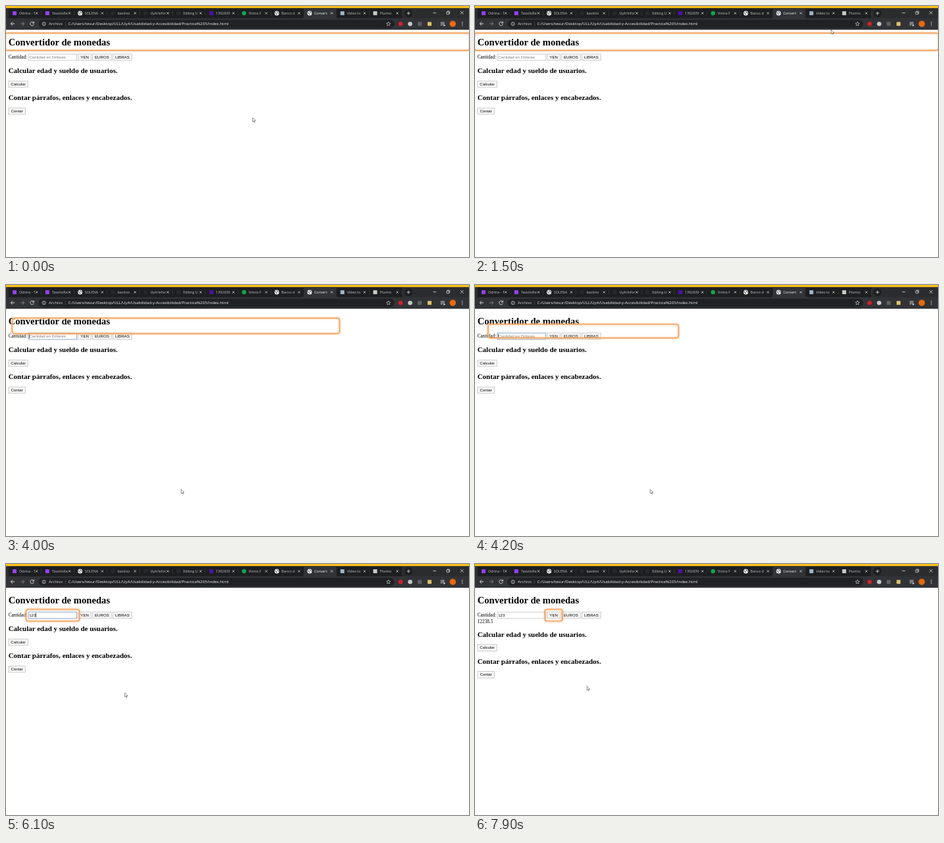
Write an HTML page that moves like this. It is 704x382 px and loops after 8 s.

```html
<!DOCTYPE html>
<html lang="es">
<head>
<meta charset="utf-8">
<title>Convertidor de monedas</title>
<style>
html, body { margin: 0; width: 100%; height: 100%; overflow: hidden; background: #fff; }
svg { display: block; width: 100vw; height: 100vh; }
svg svg { width: 24px; height: 16px; }
text { white-space: pre; }
.ui { font-family: "Open Sans", "Noto Sans", sans-serif; }
.serif { font-family: "Liberation Serif", "Times New Roman", serif; }
.form { font-family: "Liberation Sans", Arial, sans-serif; font-size: 6.11px; }
</style>
</head>
<body>
<svg id="stage" viewBox="0 0 704 382">
  <defs>
    <filter id="glow" filterUnits="userSpaceOnUse" x="-10" y="30" width="724" height="80">
      <feGaussianBlur stdDeviation="0.9"/>
    </filter>
  </defs>
</svg>
<script>
const NS = 'http://www.w3.org/2000/svg';
const stage = document.getElementById('stage');

function add(parent, tag, attrs, content) {
  const node = document.createElementNS(NS, tag);
  set(node, attrs);
  if (content !== undefined) node.textContent = content;
  return parent.appendChild(node);
}
function set(node, attrs) {
  for (const key in attrs) node.setAttribute(key, attrs[key]);
}
const rect = (p, x, y, width, height, fill, more) =>
  add(p, 'rect', { x, y, width, height, fill, ...more });
const disc = (p, cx, cy, r, fill, more) => add(p, 'circle', { cx, cy, r, fill, ...more });
const line = (p, d, stroke, width = 0.8) =>
  add(p, 'path', { d, stroke, 'stroke-width': width, fill: 'none' });
const label = (p, x, y, str, cls, size, fill = '#000', more) =>
  add(p, 'text', { x, y, class: cls, fill, ...(size && { 'font-size': size }), ...more }, str);
const show = (node, on) => set(node, { visibility: on ? 'visible' : 'hidden' });

// Browser frame
const STRIP = '#2b2c2e', TAB_BACK = '#1d1e20', BAR = '#323337', PALE = '#e8eaed';
const TAB = 49.85, ACTIVE = 9;
const frame = add(stage, 'g', {});
rect(frame, 0, 0, 704, 20, STRIP);
rect(frame, 4, 3.2, TAB * 12, 16, TAB_BACK);
rect(frame, 0, 0, 704, 3.2, '#fcc21b');
rect(frame, 0, 18.6, 704, 17.6, BAR);

function globe(x, y) {
  disc(frame, x, y, 3.5, '#f1f3f4');
  line(frame, `M${x - 2.6} ${y - 0.8}l2 1.2 0.4 1.8M${x + 0.2} ${y - 2.6}l0.6 1.6 2 0.6`, '#3c4043', 1);
}
const square = color => (x, y) => rect(frame, x - 3, y - 3, 6, 6, color, { rx: 0.6 });
const round = color => (x, y) => disc(frame, x, y, 3.3, color);

const tabs = [
  ['Odrina - T', square('#8f43f0')], ['TavolioRe', square('#8f43f0')],
  ['SOLENA', globe], ['bastino', round('#24292e')], ['UyA/infor', round('#24292e')],
  ['Editing U', round('#24292e')], ['1392639', square('#4a12a8')],
  ['Vintra F', round('#12a150')], ['Banco d', globe], ['Convert', globe],
  ['Video to', square('#9fb4c4')], ['Plumio', square('#c9c9c6')]
];
tabs.forEach(([name, icon], i) => {
  const x = 4 + TAB * i, active = i === ACTIVE;
  if (active) {
    add(frame, 'path', {
      d: `M${x - 3} 19q3 0 3-3V6.5q0-3 3-3h${TAB - 6}q3 0 3 3V16q0 3 3 3z`, fill: BAR
    });
  } else if (i !== ACTIVE - 1) {
    line(frame, `M${x + TAB} 7.5v7`, '#4a4c50', 0.5);
  }
  icon(x + 9, 11);
  const box = add(frame, 'svg', { x: x + 16, y: 3, width: 24, height: 16 });
  label(box, 0, 10, name, 'ui', 5.4, active ? '#f1f3f4' : '#c3c6ca');
  const cx = x + 42.7;
  line(frame, `M${cx - 1.6} 9.4l3.2 3.2m0-3.2l-3.2 3.2`, PALE, 0.75);
});
disc(frame, 612, 11, 6, TAB_BACK);
line(frame, 'M609.4 11h5.2M612 8.4v5.2', PALE);
line(frame, 'M649.5 10.5h4.6M691 8l4.6 4.6m0-4.6l-4.6 4.6', '#fff', 0.7);
line(frame, 'M670 9h3.6v3.6H670zM671 9V8h3.6v3.6h-1', '#fff', 0.6);

// Toolbar
line(frame, 'M13 27H7.4m2.6-2.7L7.3 27l2.7 2.7', PALE, 0.9);
line(frame, 'M22.2 27h5.6m-2.6-2.7l2.7 2.7-2.7 2.7', '#85888c', 0.9);
line(frame, 'M41.8 25.2a2.8 2.8 0 1 0 0.5 2.6M42.4 23.8v2.3h-2.3', PALE, 0.9);
rect(frame, 49.5, 21, 541, 12.4, '#202124', { rx: 6.2 });
disc(frame, 57.7, 27.2, 2.6, 'none', { stroke: PALE, 'stroke-width': 0.7 });
line(frame, 'M57.7 26.8v1.8M57.7 25.4v0.8', PALE, 0.7);
label(frame, 65, 29.4, 'Archivo', 'ui', 6.12, '#d4d7da');
line(frame, 'M90.6 23.6v7', '#5f6368', 0.5);
label(frame, 94.4, 29.4,
  'C:/Users/tevur/Desktop/ULL/UyA/Usabilidad-y-Accesibilidad/Practica%205/index.html',
  'ui', 6.16, '#f1f3f4');
line(frame, 'M581.5 24l0.9 2.1 2.2 0.2-1.7 1.5 0.5 2.2-1.9-1.2-1.9 1.2 0.5-2.2-1.7-1.5 2.2-0.2z', PALE, 0.6);
round('#d3202c')(600, 27.2);
round('#c6c8ca')(614.5, 27.2);
square('#5d6064')(629, 27.2);
square('#dcc06c')(644, 27.2);
line(frame, 'M660.8 25h6M660.8 27h6M660.8 29h3', PALE);
add(frame, 'path', { d: 'M665.4 27.8l2.8 1.6-2.8 1.6z', fill: PALE });
disc(frame, 679.3, 27.2, 4.8, '#e56a0c');
[24.8, 27.2, 29.6].forEach(y => disc(frame, 693.8, y, 0.7, PALE));

// Page
const page = add(stage, 'g', {});
function button(parent, x, y, width, name) {
  rect(parent, x, y, width, 9.8, '#f7f7f7', { stroke: '#adadad', 'stroke-width': 0.6 });
  label(parent, x + width / 2, y + 7, name, 'form', 0, '#000', { 'text-anchor': 'middle' });
}
const bold = { 'font-weight': 700 };
label(page, 3.67, 59.8, 'Convertidor de monedas', 'serif', 14.67, '#000', bold);
label(page, 3.67, 80.2, 'Cantidad:', 'serif', 7.33);
const field = rect(page, 34, 73.1, 73.7, 9.8, '#fff');
const hint = label(page, 35.2, 80, 'Cantidad en Dólares', 'form', 0, '#7d7d7d');
const typed = label(page, 35.2, 80, '', 'form');
const caret = rect(page, 35, 74.6, 0.6, 6.8, '#000');
button(page, 109.8, 73, 19.6, 'YEN');
button(page, 131.6, 73, 28.6, 'EUROS');
button(page, 162.5, 73, 28.7, 'LIBRAS');
const result = label(page, 3.67, 89.8, '12238.5', 'serif', 7.33);

const lower = add(page, 'g', {});
label(lower, 3.67, 102.3, 'Calcular edad y sueldo de usuarios.', 'serif', 11, '#000', bold);
button(lower, 3.9, 114.1, 29.3, 'Calcular');
label(lower, 3.67, 143.2, 'Contar párrafos, enlaces y encabezados.', 'serif', 11, '#000', bold);
button(lower, 3.9, 155.1, 25.4, 'Contar');

// Focus ring and pointer
const ring = add(stage, 'g', { fill: 'none' });
const ringRects = [
  add(ring, 'rect', { rx: 3.5, stroke: '#f8b87c', 'stroke-width': 3, opacity: 0.7, filter: 'url(#glow)' }),
  add(ring, 'rect', { rx: 3.5, stroke: '#ef974c', 'stroke-width': 1.2 })
];
const pointer = add(stage, 'path', {
  d: 'M0 0V6.3L1.5 5 2.5 7.2 3.5 6.8 2.5 4.6H4.5Z',
  fill: '#fff', stroke: '#444', 'stroke-width': 0.6, 'stroke-linejoin': 'round'
});

// Each key: time, then values (x, y / left, top, right, bottom)
const pointerKeys = [
  [0, 375, 170], [300, 330, 148], [900, 150, 120], [1200, 103, 187], [1300, 200, 248],
  [1500, 541.5, 36], [1800, 560, 45], [2700, 152, 63], [2800, 266.3, 311],
  [5700, 266.3, 311], [6100, 180.6, 196], [6600, 122, 80], [7500, 122, 80], [7900, 170.2, 185.8]
];
const ringKeys = [
  [0, -1.2, 41.2, 705, 67.6], [3800, -1.2, 41.2, 705, 67.6],
  [4400, 30.4, 69, 111.8, 87], [6600, 30.4, 69, 111.8, 87],
  [7200, 106.2, 69, 133, 87]
];
const typing = [[5200, '1'], [5600, '12'], [5800, '123']];

function track(keys, t) {
  const i = keys.findIndex(k => k[0] > t);
  if (i < 0) return keys[keys.length - 1].slice(1);
  const a = keys[i - 1], b = keys[i], u = (t - a[0]) / (b[0] - a[0]);
  return a.slice(1).map((v, n) => v + (b[n + 1] - v) * u);
}

function draw(t) {
  const [x, y] = track(pointerKeys, t);
  set(pointer, { transform: `translate(${x} ${y})` });

  const [left, top, right, bottom] = track(ringKeys, t);
  ringRects.forEach(r => set(r, { x: left, y: top, width: right - left, height: bottom - top }));

  const focused = t >= 3900 && t < 6700, converted = t >= 6700;
  set(field, { stroke: focused ? '#6691c4' : '#adadad', 'stroke-width': focused ? 0.8 : 0.6 });

  let value = '', since = 4000;
  for (const [at, str] of typing) if (t >= at) { value = str; since = at; }
  typed.textContent = value;
  show(hint, !value);
  set(caret, { x: 35 + value.length * 3.4 });
  show(caret, focused && (t < since || Math.floor((t - since) / 500) % 2 === 0));

  show(result, converted);
  set(lower, { transform: `translate(0 ${converted ? 8.4 : 0})` });
}

function tick() {
  draw(Math.floor(performance.now() % 8000 / 100) * 100);
  requestAnimationFrame(tick);
}
tick();
</script>
</body>
</html>
```
